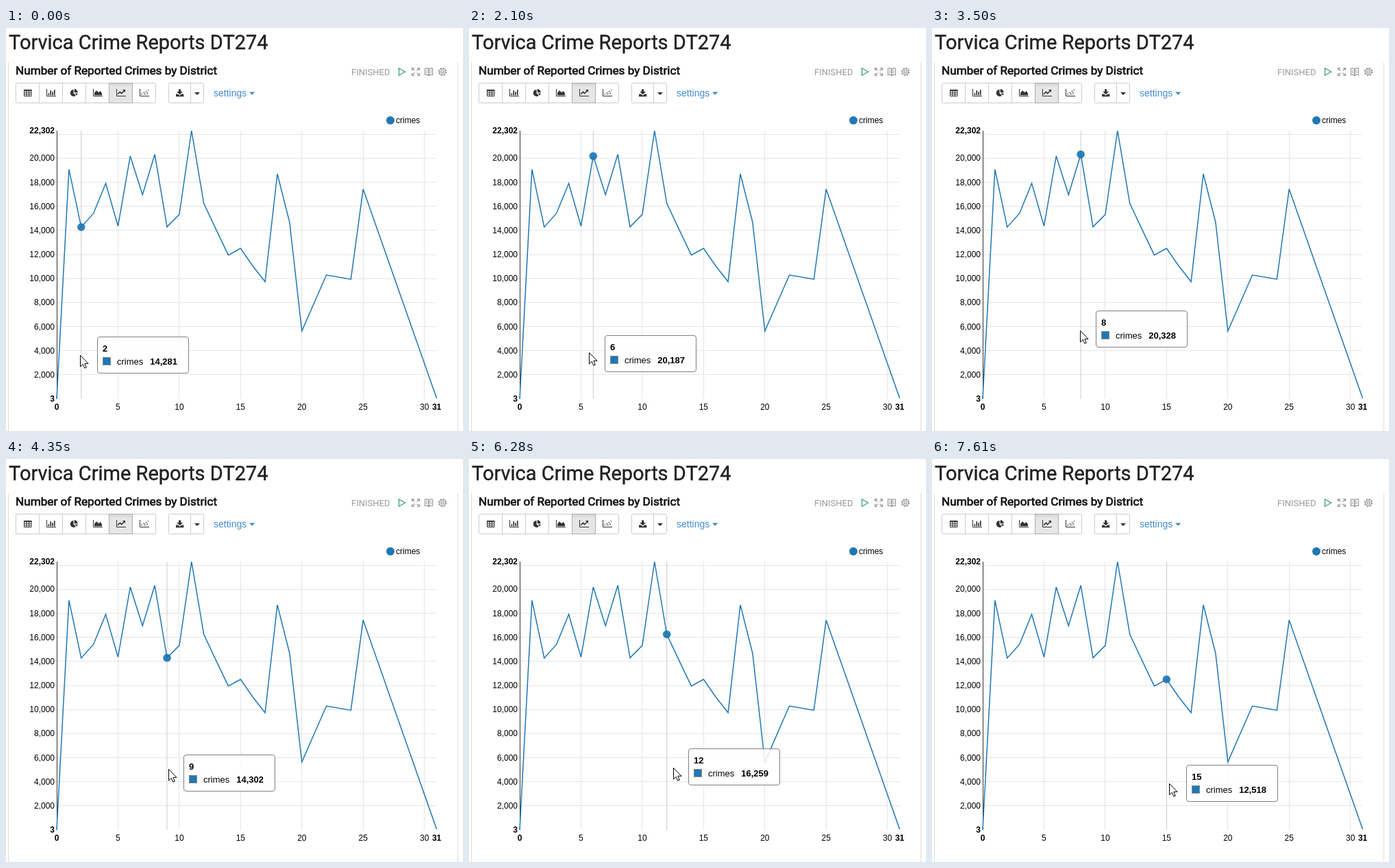
Animation of 667 by 589 pixels, one loop 8 s. Source, as an HTML page:

```html
<!DOCTYPE html>
<html lang="en">
<head>
<meta charset="utf-8">
<title>Reported crimes</title>
<style>
  html, body { margin: 0; width: 100%; height: 100%; overflow: hidden; background: #fff; }
  svg { display: block; font: 12px "Liberation Sans", Arial, sans-serif; }
  .roboto { font-family: Roboto, sans-serif; }
  .bold { font-weight: bold; }
  .grid { stroke: #e5e5e5; }
  .grid, .crisp { shape-rendering: crispEdges; }
  .button { fill: #fff; stroke: #ccc; }
  .tool { fill: none; stroke: #999; stroke-width: 1.2; }
  .stroked { fill: none; stroke: #333; }
  #tip { font-size: 13px; }
</style>
</head>
<body>
<svg width="667" height="589" viewBox="0 0 667 589">
  <defs>
    <linearGradient id="pressed" x2="0" y2="1">
      <stop stop-color="#d2d2d2"/>
      <stop offset=".2" stop-color="#e6e6e6"/>
    </linearGradient>
    <path id="corner" d="M-5.5 -2V-5.5H-2M-5 -5L-1.5 -1.5"/>
    <path id="page" d="M0 -4Q3 -6 5.5 -5V4.5Q3 3.5 0 5.5ZM1.5 -2H4M1.5 .5H4"/>
    <path id="frame" d="M.5 0V10.5H14" class="stroked"/>
  </defs>

  <path d="M3.5 50V589M659.5 50V589" stroke="#ddd" class="crisp"/>
  <text class="roboto" x="4" y="31" font-size="29" fill="#212121" stroke="#212121" stroke-width=".4">Torvica Crime Reports DT274</text>
  <text class="roboto" x="14" y="68" font-size="17.15" fill="#111" stroke="#111" stroke-width=".7">Number of Reported Crimes by District</text>
  <text class="roboto" x="504" y="69" font-size="13" fill="#999">FINISHED</text>

  <path d="M573.5 58.8L582.6 64L573.5 69.2Z" fill="none" stroke="#3f9a8a" stroke-width="1.3"/>
  <g class="tool">
    <g id="expand" transform="translate(598 64)"></g>
    <use href="#page" x="617" y="64"/>
    <use href="#page" transform="translate(617 64) scale(-1 1)"/>
    <g transform="translate(637 64)">
      <circle r="4.3"/>
      <circle r="1.9"/>
      <circle r="5.5" stroke-width="1.6" stroke-dasharray="2.2 2.12"/>
    </g>
  </g>

  <rect class="button" x="14.5" y="80.5" width="204" height="29" rx="2"/>
  <path d="M48.5 81V109M82.5 81V109M116.5 81V109" stroke="#ccc" class="crisp"/>
  <rect x="150.5" y="80.5" width="34" height="29" fill="url(#pressed)" stroke="#adadad"/>
  <rect class="button" x="237.5" y="80.5" width="51" height="29" rx="2"/>
  <path d="M269.5 81V109" stroke="#ccc" class="crisp"/>

  <g fill="#333">
    <path class="stroked" d="M26.5 91V99.5H37V91M30 91V99.5M33.5 91V99.5M26.5 94H37M26.5 96.8H37"/>
    <path d="M26 90H37.5V92H26Z"/>
    <use href="#frame" x="59" y="89"/>
    <path class="stroked" stroke-width="1.7" d="M62.3 98.3v-3M65.2 98.3v-7M68 98.3v-5M70.8 98.3v-8"/>
    <path d="M98.5 90A5 5 0 1 0 102 98.7L98.5 95.2ZM99.7 89.2V94.2H104.7A5 5 0 0 0 99.7 89.2ZM100.3 95.4L103.3 98.4A5 5 0 0 0 104.7 95.4Z"/>
    <use href="#frame" x="127" y="89"/>
    <path d="M129 98.3V95L132 91.3L135.2 94.3L137.7 92L140 95.5V98.3Z"/>
    <use href="#frame" x="161" y="89"/>
    <path class="stroked" stroke-width="1.5" d="M163 96.7L166.4 93.4L168.6 95.6L173 91.2"/>
    <path d="M170 90H174V94Z"/>
    <use href="#frame" x="195" y="89"/>
    <path class="stroked" stroke-width="1.5" stroke-dasharray="1.5 2.2" d="M197.5 96.8L208 90.7M202 96.8L208 94.5"/>
    <path d="M252 89.5H255.2V93H258L253.6 97.3L249.2 93H252ZM248 96.5H251L253.6 98.8L256.2 96.5H259.3V100.3H248Z"/>
    <path d="M275 94H283L279 98Z"/>
  </g>
  <text x="303" y="100" font-size="14" fill="#428bca">settings</text>
  <path d="M355 93.5H363.4L359.2 97.7Z" fill="#428bca"/>

  <circle cx="561" cy="135" r="6" fill="#1f77b4"/>
  <text x="569" y="139">crimes</text>

  <g id="axes"></g>
  <path d="M74.5 150V542" stroke="#000" stroke-opacity=".8" class="crisp"/>
  <path id="guide" stroke="#ccc"/>
  <path id="curve" fill="none" stroke="#1f77b4" stroke-width="1.5"/>
  <circle id="dot" r="5.8" fill="#1f77b4" fill-opacity=".93"/>

  <g id="tip">
    <rect x=".5" y=".5" width="133" height="53" rx="3.5" fill="#fff" fill-opacity=".85" stroke="#808080"/>
    <text id="district" class="bold" x="8" y="22"></text>
    <rect x="8.5" y="30.5" width="11" height="11" fill="#1f77b4" stroke="#8a8a8a"/>
    <text x="29" y="41">crimes</text>
    <text id="count" class="bold" x="117" y="41" text-anchor="end"></text>
  </g>
  <path id="cursor" d="M.5 .5V17L4.3 13.4L6.8 19.2L9.3 18.1L6.9 12.4H12Z" fill="#fff" stroke="#000"/>
</svg>
<script>
  const LOOP = 8000, REPAINT = 77;

  // Crimes by district; holes are districts without reports.
  const counts = [
    3, 19086, 14281, 15422, 17918, 14364, 20187, 16975, 20328, 14302, 15326, 22302, 16259,
    14092, 11954, 12518, 11040, 9742, 18702, 14680, 5642, , 10301, , 9950, 17440
  ];
  counts[31] = 40;

  // Pointer moves: start, end, then the place reached.
  const home = [108, 478];
  const moves = [
    [80, 230, 128, 476], [540, 1080, 148, 473], [1320, 1860, 173, 476],
    [2100, 3030, 202, 448], [3200, 3500, 214, 440], [3500, 4180, 234, 459],
    [4350, 4720, 247, 431], [5030, 5410, 277, 430],
    [5640, 6280, 295, 450], [6280, 7610, 346, 474]
  ];

  const left = 74, step = 554.6 / 31;
  const el = id => document.getElementById(id);
  const xOf = district => left + district * step;
  const yOf = count => 542 - (count - 3) * 392 / 22299;
  const format = n => n.toLocaleString("en-US");

  function drawChart() {
    let svg = "";
    const label = (x, y, text, anchor, style = "") =>
      svg += `<text x="${x}" y="${y}" text-anchor="${anchor}" class="${style}">${text}</text>`;
    for (let n = 2000; n <= 22000; n += 2000) {
      svg += `<path class="grid" d="M${left} ${yOf(n)}H628"/>`;
      if (n < 22000) label(71, yOf(n) + 4, format(n), "end");
    }
    for (let d = 5; d <= 30; d += 5) {
      svg += `<path class="grid" d="M${xOf(d)} 150V542"/>`;
      label(xOf(d), 558, d, "middle");
    }
    for (const n of [3, 22302]) label(71, yOf(n) + 4, format(n), "end", "bold");
    for (const d of [0, 31]) label(xOf(d), 558, d, "middle", "bold");
    el("axes").innerHTML = svg;

    const points = [];
    counts.forEach((n, d) => points.push(`${xOf(d)} ${yOf(n)}`));
    el("curve").setAttribute("d", "M" + points.join("L"));

    for (let turn = 0; turn < 360; turn += 90)
      el("expand").innerHTML += `<use href="#corner" transform="rotate(${turn})"/>`;
  }

  // The screen repaints in even steps while the pointer moves and holds in between.
  function repaintTime(t) {
    const move = moves.findLast(([start]) => start <= t);
    if (!move) return 0;
    const [start, end] = move, length = end - start;
    const repaints = Math.round(length / REPAINT);
    const progress = Math.min(1, (t - start) / length);
    return start + length * Math.floor(progress * repaints + 0.1) / repaints;
  }

  function pointerAt(t) {
    let [x, y] = home;
    for (const [start, end, toX, toY] of moves) {
      const k = Math.min(1, Math.max(0, (t - start) / (end - start)));
      x += (toX - x) * k;
      y += (toY - y) * k;
    }
    return [Math.round(x), Math.round(y)];
  }

  const place = (id, x, y) => el(id).setAttribute("transform", `translate(${x} ${y})`);

  function render(now) {
    const t = repaintTime(now % LOOP);
    const [hoverX, hoverY] = pointerAt(t);
    const district = Math.round((hoverX - left) / step);
    const x = xOf(district);
    place("cursor", ...pointerAt(t + REPAINT)); // the tooltip trails by one repaint
    place("tip", hoverX + 25, hoverY - 27);
    place("dot", x, yOf(counts[district]));
    el("guide").setAttribute("d", `M${x} 150V542`);
    el("district").textContent = district;
    el("count").textContent = format(counts[district]);
  }

  drawChart();
  const begin = performance.now();
  function tick() {
    render(performance.now() - begin);
    requestAnimationFrame(tick);
  }
  tick();
</script>
</body>
</html>
```
